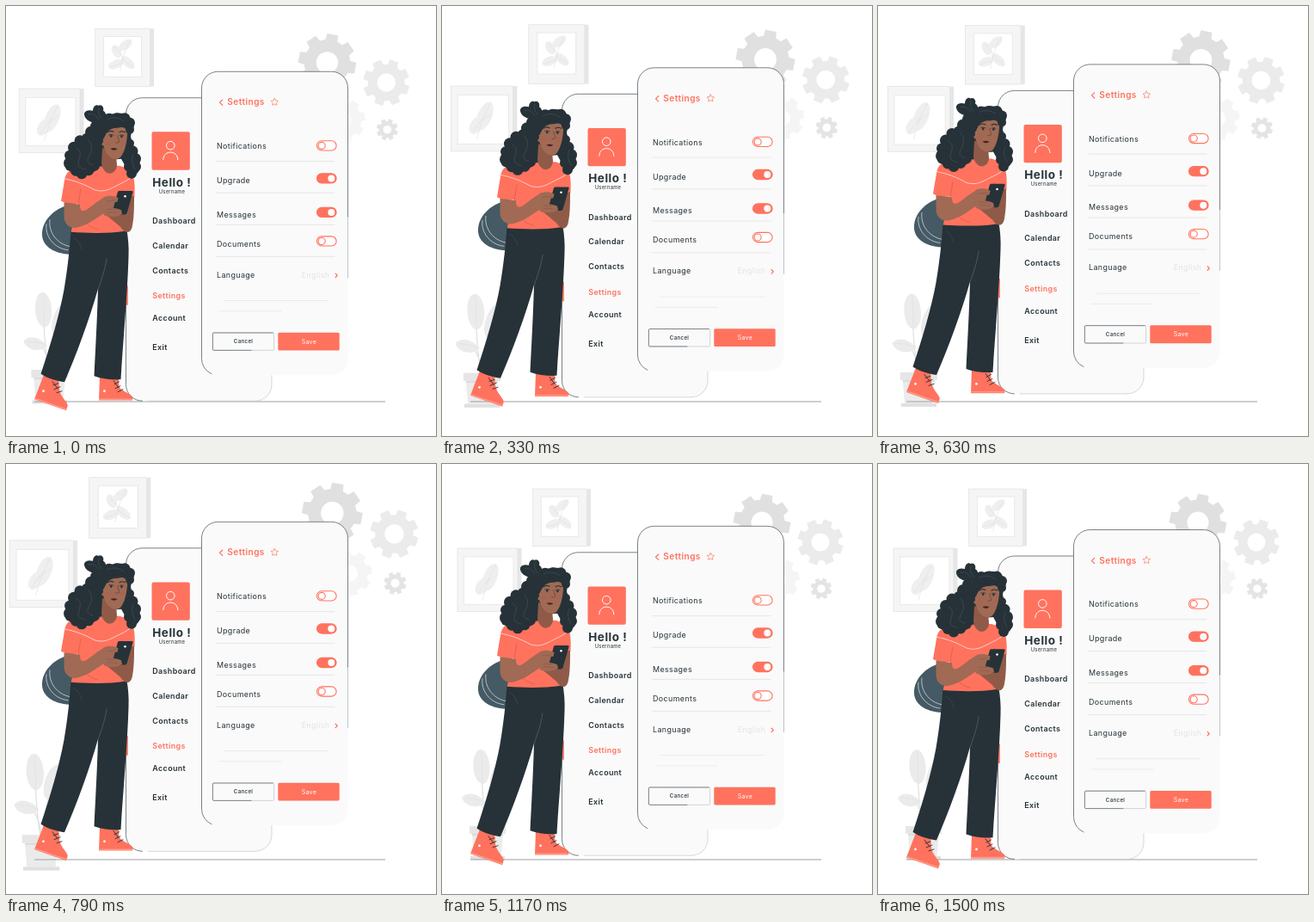
An HTML page for the animation above (1.54 s loop, 500 by 500 pixels).

```html
<!DOCTYPE html>
<html lang="en">
<head>
<meta charset="utf-8">
<title>Settings screen illustration</title>
<style>
  html, body { margin: 0; width: 100%; height: 100%; overflow: hidden; background: #fff; }
  svg { display: block; width: 100vw; height: 100vh; }
  text { font-family: Inter, "Open Sans", sans-serif; letter-spacing: .04em; }
</style>
</head>
<body>
<svg viewBox="0 0 500 500" fill="none">
  <g id="back"></g>
  <path d="M33 460H441" stroke="#9a9fa1" stroke-width="1.2"/>
  <g id="float">
    <g id="menu"></g>
    <g id="panel"></g>
    <g id="woman"></g>
  </g>
</svg>
<script>
const CORAL = '#ff725e', DARK = '#263238', SKIN = '#a06a55', SHADE = '#8f5b48', EDGE = '#59646a';
const $ = id => document.getElementById(id);

const path = (d, fill = 'none', stroke = 'none', w = 1) =>
  `<path d="${d}" fill="${fill}" stroke="${stroke}" stroke-width="${w}" stroke-linecap="round" stroke-linejoin="round"/>`;
const line = (d, stroke, w) => path(d, 'none', stroke, w);
const rect = (x, y, w, h, fill, r = 0, stroke = 'none', sw = 1) =>
  `<rect x="${x}" y="${y}" width="${w}" height="${h}" rx="${r}" fill="${fill}" stroke="${stroke}" stroke-width="${sw}"/>`;
const oval = (x, y, rx, ry, fill, turn = 0, stroke = 'none', sw = 1) =>
  `<ellipse cx="${x}" cy="${y}" rx="${rx}" ry="${ry}" fill="${fill}" stroke="${stroke}" stroke-width="${sw}" transform="rotate(${turn} ${x} ${y})"/>`;
const text = (x, y, s, size, weight = 400, fill = DARK, anchor = 'start') =>
  `<text x="${x}" y="${y}" font-size="${size}" font-weight="${weight}" fill="${fill}" text-anchor="${anchor}">${s}</text>`;

function gear(cx, cy, outer, body, hole, turn, fill) {
  const at = (r, a) => `${(cx + r * Math.cos(a)).toFixed(2)} ${(cy + r * Math.sin(a)).toFixed(2)}`;
  let d = '';
  for (let i = 0; i < 8; i++) {
    const a = turn * Math.PI / 180 + i * Math.PI / 4;
    d += (i ? `A${body} ${body} 0 0 1 ` : 'M') + at(body, a - .27) +
      `L${at(outer, a - .19)}L${at(outer, a + .19)}L${at(body, a + .27)}`;
  }
  d += `A${body} ${body} 0 0 1 ${at(body, turn * Math.PI / 180 - .27)}Z`;
  d += `M${cx - hole} ${cy}a${hole} ${hole} 0 1 0 ${2 * hole} 0a${hole} ${hole} 0 1 0 ${-2 * hole} 0Z`;
  return `<path d="${d}" fill="${fill}" fill-rule="evenodd"/>`;
}

function frame(x, y, w, h, ix, iy, iw, ih) {
  return rect(x + w, y, 4.5, h, '#e6e6e6') +
    rect(x, y, w, h, '#f5f5f5', 0, '#e0e0e0', .7) +
    rect(ix, iy, iw, ih, '#fff', 0, '#e6e6e6', .8);
}

function drawBack() {
  const leaf = '#efefef', vein = '#e0e0e0';
  return frame(105.5, 29, 63, 66.5, 115.3, 38, 43.5, 46.5) +
    oval(140, 48, 9, 5, leaf, -38) + oval(130, 55, 5, 8, leaf, -30) +
    oval(129, 70, 9, 5, leaf, -22) + oval(143, 68, 5, 9.5, leaf, -48) +
    line('M146 42Q138 54 134 78M128 50L137 61M123 73L135 69M149 73L136 64', vein, .6) +
    frame(18, 98, 70, 73.5, 25.5, 108, 57.5, 55.5) +
    oval(56, 132, 8, 17, leaf, 22) + oval(47, 142, 7, 11, leaf, 35) +
    line('M63 117Q53 134 47 158M42 150L56 131M50 139L64 129', vein, .6) +
    gear(391, 134, 25, 20, 9, -100, '#f5f5f5') +
    gear(372, 68, 33.5, 26.5, 12.5, -79, '#e0e0e0') +
    gear(440, 91, 27, 21, 10.5, -70, '#ebebeb') +
    gear(441, 145, 12.5, 9.5, 4.8, -70, '#e4e4e4') +
    line('M46 352Q47 395 52 422M40 391Q50 397 53 422M66 362Q56 390 55 422', '#e0e0e0', 1.2) +
    oval(46, 352, 9.5, 20, '#ebebeb', -4) + oval(66, 363, 9, 20, '#ebebeb', 18) +
    path('M23 388C28 381 41 382 50 393C45 401 27 400 23 388Z', '#ebebeb') +
    line('M46 335L47 372M27 388Q39 388 50 393', '#e0e0e0', .6) +
    path('M35 430H71L68.5 456H37Z', '#ebebeb') + rect(32, 421, 42, 9, '#e6e6e6') +
    rect(35, 430, 36, 2, '#dcdcdc') + rect(33, 456, 40, 4, '#e0e0e0');
}

function drawMenu() {
  const items = [['Dashboard', 253.3], ['Calendar', 282], ['Contacts', 311],
    ['Settings', 340.6], ['Account', 366.6], ['Exit', 400.3]];
  return rect(139.5, 107, 169.5, 352.5, '#fafafa', 19) +
    line('M290 459.5A19 19 0 0 0 309 440V428M165 459.5H290', '#b9bfc1', .6) +
    line('M228 107H158.5A19 19 0 0 0 139.5 126V440.5A19 19 0 0 0 158.5 459.5', EDGE, .8) +
    rect(139.5, 325.5, 2.3, 22.5, CORAL) +
    rect(169.5, 146.6, 44.3, 44.3, CORAL, 2) +
    oval(191.3, 162.4, 4.8, 4.8, 'none', 0, '#fff', 1) +
    line('M182.8 179C182.8 167.3 199.8 167.3 199.8 179', '#fff', 1) +
    text(170.2, 210, 'Hello !', 13.5, 700) +
    text(193, 218, 'Username', 5.9, 400, DARK, 'middle') +
    items.map(([s, y]) => text(170.3, y, s, 8.95, 600, s === 'Settings' ? CORAL : DARK)).join('');
}

function toggle(y, on) {
  return rect(361.5, y - 5.6, 22.6, 11.2, on ? CORAL : '#fff', 5.6, CORAL, 1.1) +
    (on ? oval(378.3, y, 4, 4, '#fff') : oval(367.2, y, 4, 4, '#fff', 0, CORAL, 1.1));
}

function drawPanel() {
  const rows = [['Notifications', 166.2], ['Upgrade', 206.4], ['Messages', 245.8], ['Documents', 279.8], ['Language', 316]];
  let star = '';
  for (let i = 0; i < 10; i++) {
    const r = i % 2 ? 2.3 : 4.4, a = (i * 36 - 90) * Math.PI / 180;
    star += (i ? 'L' : 'M') + (312.3 + r * Math.cos(a)).toFixed(2) + ' ' + (112 + r * Math.sin(a)).toFixed(2);
  }
  return rect(227.5, 76.5, 170, 353, '#fafafa', 19) +
    line('M397.5 245V316', '#a5acaf', .7) +
    line('M397.5 245V95.5A19 19 0 0 0 378.5 76.5H246.5A19 19 0 0 0 227.5 95.5V410.5A19 19 0 0 0 239 428', EDGE, .8) +
    line('M251.7 109.4L248.5 112.5L251.7 115.6', CORAL, 1.2) +
    text(257.3, 115.6, 'Settings', 10.1, 600, CORAL) +
    line(star + 'Z', CORAL, .7) +
    rows.map(([s, y]) => text(245, y, s, 8.95)).join('') +
    line('M245 180.8H382M244 217.5H382M244 254.6H382M244 291.6H382', '#dedede', .7) +
    line('M254 342.8H375M248 355H320', '#e4e4e4', .7) +
    toggle(162.6, 0) + toggle(200.7, 1) + toggle(240.2, 1) + toggle(273.7, 0) +
    text(343.8, 315.8, 'English', 8.8, 400, '#e3e3e3') +
    line('M383.2 311.4L385.3 313.6L383.2 315.8', CORAL, 1.3) +
    rect(240.4, 380.2, 71.2, 20.4, 'none', 1.3, '#b5bbbe', .6) +
    line('M285 400.6H241.7Q240.4 400.6 240.4 399.3V381.5Q240.4 380.2 241.7 380.2H310.3', EDGE, .7) +
    text(276, 392.7, 'Cancel', 6.3, 500, DARK, 'middle') +
    rect(316.3, 379.9, 71.4, 20.8, CORAL, 1.5) +
    text(352.4, 392.8, 'Save', 7, 400, '#fff', 'middle');
}

const curls = s => s.split(',').map(c => {
  const [x, y, r] = c.trim().split(' ');
  return oval(x, y, r, r, DARK);
}).join('');

function drawShoes() {
  return path('M44 429L61 434L62 446C63 454 71 460 71.8 465L70 470.5L33 457.5Z', CORAL) +
    line('M33.6 456.5L70.5 469.2', '#ffb5a9', .8) +
    line('M55 441L61 439M56 446L63 443M59 450L65 448M54 437L60 445', DARK, .9) +
    oval(43.5, 448, 1.4, 1.4, '#fff') +
    path('M109 431L131 432L131.5 443C135 449 146 450.5 147.5 456L147 458.7H108Z', CORAL) +
    line('M108.5 457.4H147', '#ffb5a9', .8) +
    line('M126 440L131.5 437M127 445L133 442M130 449L136 446M125 436L131 444', DARK, .9) +
    oval(114.5, 448, 1.4, 1.4, '#fff');
}

function drawWoman() {
  const bag = path('M72 232C56 236 41 250 42 267C43 281 58 290 82 289L86 240Z', '#455a64') +
    line('M47 254C45 267 55 282 72 284M51 249C49 262 58 277 75 280', '#e6ebed', .7);

  const pants = path('M75.5 261C74 283 72 303 67.5 330C62.5 358 51 397 40.5 428C48 433 59 436.5 68 437.5C82 405 97 365 107 329C106 365 104 400 102.5 430.5C112 434 124 435 133.5 434.5C136 390 141 340 142.5 292C143 280 142 270 140.5 261Z', DARK) +
    line('M117 294C115 308 111 318 107 330', '#546066', .8) +
    line('M79 270C83 272 87 278 88 283', '#3f4b51', .7);

  const shirt = path('M86 187C75 189 69 194 68 203L64 227C70 230 78 231 84 230L81 243L75.5 263C95 264.5 120 265 138 262L138 226L149.5 222C150 210 150 198 144 190L132 186Z', CORAL) +
    line('M67 201C80 203 92 208 103 214C113 217 119 214 127 210C134 206 141 204 146 199', '#ffe1dc', .8) +
    line('M84 230L87 213M138 227L135 214M92 252Q100 259 107 260', '#d95a48', .7);

  const arms = path('M134 224L149 221C149 234 149 247 146.5 258C144 266 137 264 133 257L115 242L123 233L136 240Z', SHADE) +
    path('M67.5 228.5L86 231C86 238 88 239 92 238C100 234 108 224 118 222C124 221 130 222 133 225C131 231 125 235 118 238C108 245 96 255 82 258C74 259 68 254 67.5 246Z', SKIN) +
    path('M131.5 215.3H146.5Q148 215.3 147.6 216.8L140.6 241Q140.1 242.8 138.3 242.8H124.5Q122.9 242.8 123.3 241.1L129.8 216.8Q130.2 215.3 131.5 215.3Z', DARK) +
    oval(138.5, 221.5, 1.3, 1.3, '#fff') +
    path('M113 223C120 219.5 127 221 130.5 223.5L129.5 228C125 228 121 230 116 233Z', SKIN) +
    path('M112 238C117 234 127 234 134 237.5L135 242C128 246 120 246 114 243.5Z', SKIN) +
    line('M118 236.5L128 237M118 240L130 240.5M117 227L127 226', SHADE, .8);

  const hairBack = path('M108 136C96 142 92 152 86 155C74 163 69 178 71 189C80 201 97 196 104 192L114 180L134 178L144 196C150 200 156 193 156 186C155 174 147 164 145 152L148 136L128 127Z', DARK) +
    curls('104 140 6,99 147 7,94 154 6,86 157 6.5,79 165 7,74 174 6,74.5 183 7.5,74 187 5,81 192 6,88 195 6.5,96 191 6.5,103 186 6,110 181 6,144 160 5,147 169 6.5,150 178 7,151 187 6,146 195 6,143 187 6');

  const face = path('M112 165L111 184C112 190 116 195 121 195C126 194 129 190 129 185L128 174Z', SHADE) +
    path('M113 140C110 151 112 165 118 173C123 179 130 180 134 175C139 168 142 153 141 140C136 131 119 130 113 140Z', SKIN) +
    oval(113.5, 158, 3, 4.5, SKIN) +
    line('M118 147Q121 144.5 125 146.5M132 147Q135 145 138.5 147', DARK, 1.1) +
    oval(122.2, 151.5, 1.2, 1.6, DARK) + oval(134.4, 152, 1.2, 1.6, DARK) +
    line('M119.5 150.2Q122 148.7 125 150.4M132 150.8Q135 149.2 137 150.8', DARK, .7) +
    line('M129.5 151Q131.5 156 131.7 158.5Q130 160 127.5 159', '#6f4031', .7) +
    path('M121.5 166Q126 164.5 129.5 166.5Q125 169.5 121.5 166Z', '#4a2520') +
    oval(119, 160, 3, 2, '#ab6350') + oval(136, 160, 2, 1.8, '#ab6350');

  const hairFront = path('M110 157C108 140 112 130 123 126C135 122 148 128 149 139C148 146 144 150 141 149C141 142 136 140 130 142C122 141 116 147 114 154Z', DARK) +
    curls('112 138 7,120 132 7,129 131 6.5,138 131 6.5,144 136 6,144 144 5,111 148 5,108 157 5,106 166 6,105 175 6') +
    path('M107 136C98 137 90 131 91 125C93 120.5 98 121.5 101 122C101 117 105 114 107.5 116C111 114 114.5 118 113 122C117 124 118 131 113 136Z', DARK) +
    line('M96 126Q103 124 108 132M108 119Q106 125 111 131', '#45545b', .6) +
    line('M82 166Q89 169 85 179T92 190M96 156Q103 164 97 174T101 185M148 172Q144 180 150 190M118 132Q128 127 137 134', '#45545b', .6);

  return bag + drawShoes() + pants + shirt + arms + hairBack + face + hairFront;
}

$('back').innerHTML = drawBack();
$('menu').innerHTML = drawMenu();
$('panel').innerHTML = drawPanel();
$('woman').innerHTML = drawWoman();

const LOOP = 1540, CYCLE = 1500, FPS = 24, LEAD = 18;
const beat = [[0, 1], [.1, 1.1], [.3, 1], [.4, 1], [.5, 1.1], [.6, 1], [1, 1]];

function lerpKeys(keys, p) {
  const i = Math.max(1, keys.findIndex(k => p <= k[0]));
  const [a, va] = keys[i - 1], [b, vb] = keys[i];
  return va + (vb - va) * (p - a) / (b - a);
}

// The picture advances at 24 steps a second.
function render(ms) {
  const step = Math.floor((ms % LOOP + 5) * FPS / 1000);
  const p = Math.min(step * 1000 / FPS + LEAD, CYCLE) / CYCLE;
  const s = lerpKeys(beat, p);
  const y = -10 * (1 - Math.abs(2 * p - 1));
  $('back').setAttribute('transform', `translate(250 250) scale(${s.toFixed(4)}) translate(-250 -250)`);
  $('float').setAttribute('transform', `translate(0 ${y.toFixed(3)})`);
}

let start;
function tick(now) {
  start ??= now;
  render(now - start);
  requestAnimationFrame(tick);
}
render(0);
requestAnimationFrame(tick);
</script>
</body>
</html>
```
